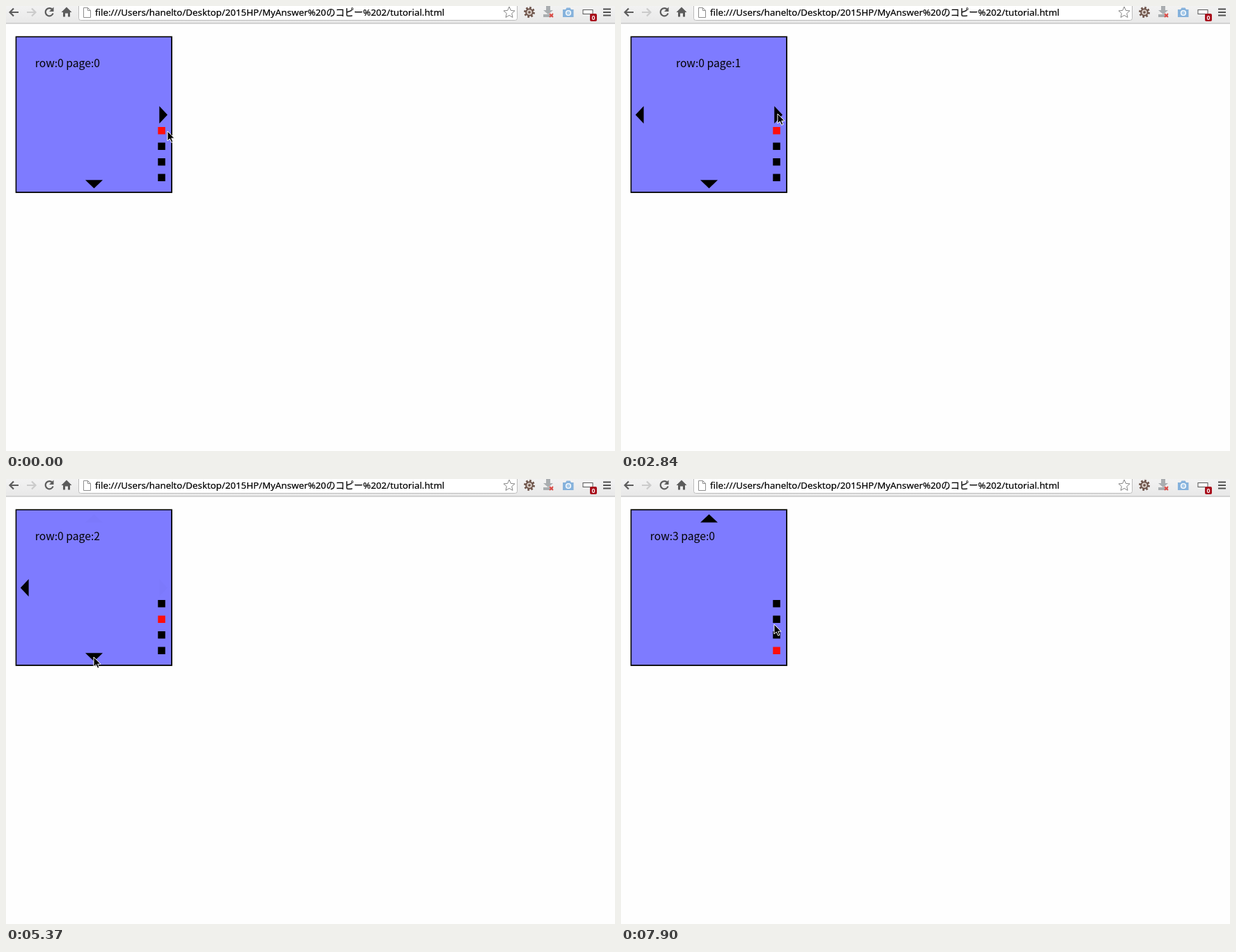
Recreate the animation shown at these times as an HTML page. Size 875 px wide and 640 px high, loop 8 s.

```html
<!DOCTYPE html>
<html lang="ja">
<head>
<meta charset="utf-8">
<title>tutorial</title>
<style>
  html, body { margin: 0; width: 100%; height: 100%; overflow: hidden; background: #fefefe; }
  svg { display: block; }
  .label { font: 15.7px "Noto Sans CJK JP", sans-serif; }
  .url { font: 13.3px "Noto Sans", "Noto Sans CJK JP", sans-serif; stroke: #000; stroke-width: .2; }
  .line { fill: none; stroke: #5c5c5c; stroke-width: 2.2; }
</style>
</head>
<body>
<svg width="875" height="640" viewBox="0 0 875 640">
  <defs>
    <linearGradient id="bar" x2="0" y2="1">
      <stop stop-color="#f2f2f2"/><stop offset="1" stop-color="#e8e8e8"/>
    </linearGradient>
    <clipPath id="window"><rect x="13.400" y="43.300" width="225.600" height="225.600"/></clipPath>
    <g id="panel">
      <rect x="14.300" y="44.200" width="223.800" height="223.800" fill="#7e7bff" stroke="#000" stroke-width="1.800"/>
      <text class="label" y="88"></text>
    </g>
  </defs>

  <rect width="875" height="25" fill="url(#bar)"/>
  <path d="M0 25H875" stroke="#b4b4b4"/>
  <rect x="104.500" y="-6" width="630" height="26.500" rx="3" fill="#fff" stroke="#bcbcbc"/>

  <path class="line" d="M18 9H6M11 3.500L5.500 9L11 14.500"/>
  <path class="line" style="stroke:#cbcbcb" d="M30 9H42M37 3.500L42.500 9L37 14.500"/>
  <path class="line" d="M66.500 5A5.600 5.600 0 1 0 67.600 10.500"/>
  <path d="M68.500 1.500V8H62z" fill="#5c5c5c"/>
  <path d="M87 1.500L94.500 9H92V15.500H89V10.500H85V15.500H82V9H79.500z" fill="#5c5c5c"/>
  <path d="M111.500 2.500H117.500L121.500 6.500V16.500H111.500zM117.500 2.500V6.500H121.500" fill="#fff" stroke="#8d8d8d"/>
  <text class="url" x="128" y="13.500">file:///Users/hanelto/Desktop/2015HP/MyAnswer%20のコピー%202/tutorial.html</text>
  <path d="M723 1L725.300 6.400L731 6.900L726.700 10.700L728 16.400L723 13.400L718 16.400L719.300 10.700L715 6.900L720.700 6.400z" fill="#fff" stroke="#858585"/>

  <circle cx="752" cy="9" r="6.600" fill="none" stroke="#6b5147" stroke-width="2.600" stroke-dasharray="2.600 2.584"/>
  <circle cx="752" cy="9" r="4.800" fill="#d8cdc6" stroke="#6b5147" stroke-width="2"/>
  <circle cx="752" cy="9" r="1.800" fill="#6b5147"/>
  <path d="M776 0H782V6H786L779 12L772 6H776zM772 12H786V16H772z" fill="#a9adb0"/>
  <path d="M781 11L786 16M786 11L781 16" stroke="#e04a45" stroke-width="1.800"/>
  <path d="M800 5H804L805.500 2.500H810.500L812 5H815.500V16H800z" fill="#86b2dc"/>
  <circle cx="808" cy="10" r="3.400" fill="#a9cbea" stroke="#fff" stroke-width="1.400"/>
  <rect x="829" y="5.500" width="14" height="6" fill="#fff" stroke="#555"/>
  <rect x="839" y="11" width="10" height="11" rx="2" fill="#a80f1c"/>
  <text x="844" y="20" text-anchor="middle" font-family="Liberation Sans, sans-serif" font-size="9" font-weight="bold" fill="#fff">0</text>
  <path d="M858 4.500H869M858 9H869M858 13.500H869" stroke="#505050" stroke-width="2.200"/>

  <g id="panels" clip-path="url(#window)"></g>
  <g id="arrows">
    <path d="M32.600 144V169L20.800 156.500z"/>
    <path d="M220.300 144V169L232 156.500z"/>
    <path d="M114 62.500H139L126.500 50.800z"/>
    <path d="M114 250.300H139L126.500 262.300z"/>
  </g>
  <g id="dots"></g>
  <path id="pointer" d="M0 0V14L3.300 11L5.700 16.300L8 15.300L5.700 10.200H10z" stroke="#fff" stroke-width="1"/>
  <g id="beam" fill="none">
    <path d="M-3 -7Q0 -7 0 -4Q0 -7 3 -7M0 -5V5M-3 7Q0 7 0 4Q0 7 3 7M-2 2H2" stroke="#fff" stroke-width="2.200" opacity=".6"/>
    <path d="M-3 -7Q0 -7 0 -4Q0 -7 3 -7M0 -5V5M-3 7Q0 7 0 4Q0 7 3 7M-2 2H2" stroke="#222"/>
  </g>
</svg>
<script>
const LOOP = 8000, SIZE = 225.6, TICK = 150, SLIDE = 500, FADE = 350;
const $ = id => document.getElementById(id);

// Each view slides in at its start time.
const views = [
  { start: -SLIDE, row: 0, page: 0 },
  { start: 2197, row: 0, page: 1 },
  { start: 3396, row: 0, page: 2 },
  { start: 5365, row: 1, page: 0 },
  { start: 6220, row: 2, page: 0 },
  { start: 7130, row: 3, page: 0 }
];
const lastPage = [2, 1, 1, 0];

// time, x, y of the mouse
const mouse = [
  [0, 232, 180], [300, 218, 155], [1500, 218, 155], [1950, 225, 155],
  [4490, 225, 155], [5220, 126, 256], [6710, 126, 256],
  [7010, 223, 246], [7610, 223, 246], [7900, 220, 209], [LOOP, 220, 209]
];
const beamTime = [7010, 7760];

// The screen is sampled every TICK, restarting at these times.
const restarts = [0, 2240, 5220, 5510, 7900];

const clamp = v => Math.min(1, Math.max(0, v));
const swing = p => 0.5 - Math.cos(Math.PI * p) / 2;
const arrowsOf = ({ row, page }) => [page > 0, page < lastPage[row], row > 0, row < 3];

const panels = [0, 1].map(() => {
  const panel = $('panel').cloneNode(true);
  panel.removeAttribute('id');
  return $('panels').appendChild(panel);
});
const dots = [0, 1, 2, 3].map(i => {
  const dot = document.createElementNS('http://www.w3.org/2000/svg', 'rect');
  const box = { x: 218.3, y: 174 + 22.5 * i, width: 10.5, height: 10.5 };
  for (const key in box) dot.setAttribute(key, box[key]);
  return $('dots').appendChild(dot);
});

function placePanel(panel, view, x, y) {
  const label = panel.querySelector('text');
  label.textContent = `row:${view.row} page:${view.page}`;
  label.setAttribute('x', view.page === 1 ? 79 : 41.8);
  panel.setAttribute('transform', `translate(${x} ${y})`);
}

function mouseAt(t) {
  const i = mouse.findIndex(key => key[0] > t);
  const [t0, x0, y0] = mouse[i - 1], [t1, x1, y1] = mouse[i];
  const p = swing((t - t0) / (t1 - t0));
  return [x0 + (x1 - x0) * p, y0 + (y1 - y0) * p];
}

function draw(t) {
  const i = views.findLastIndex(view => view.start <= t);
  const view = views[i], from = views[Math.max(0, i - 1)];
  const age = t - view.start;
  const shift = SIZE * swing(clamp(age / SLIDE));
  const [dx, dy] = view.row === from.row ? [1, 0] : [0, 1];
  placePanel(panels[0], from, -dx * shift, -dy * shift);
  placePanel(panels[1], view, dx * (SIZE - shift), dy * (SIZE - shift));

  const fade = clamp(age / FADE), before = arrowsOf(from), after = arrowsOf(view);
  [...$('arrows').children].forEach((arrow, k) => {
    arrow.setAttribute('opacity', before[k] * (1 - fade) + after[k] * fade);
  });
  dots.forEach((dot, k) => dot.setAttribute('fill', k === view.row ? '#ff0d0a' : '#000'));

  const isBeam = t >= beamTime[0] && t < beamTime[1];
  const place = `translate(${mouseAt(t).join(' ')})`;
  for (const [id, shown] of [['pointer', !isBeam], ['beam', isBeam]]) {
    $(id).setAttribute('transform', place);
    $(id).setAttribute('visibility', shown ? 'visible' : 'hidden');
  }
}

function frame() {
  const t = performance.now() % LOOP;
  const base = restarts.findLast(time => time <= t);
  draw(base + Math.floor((t - base) / TICK) * TICK);
  requestAnimationFrame(frame);
}
frame();
</script>
</body>
</html>
```
